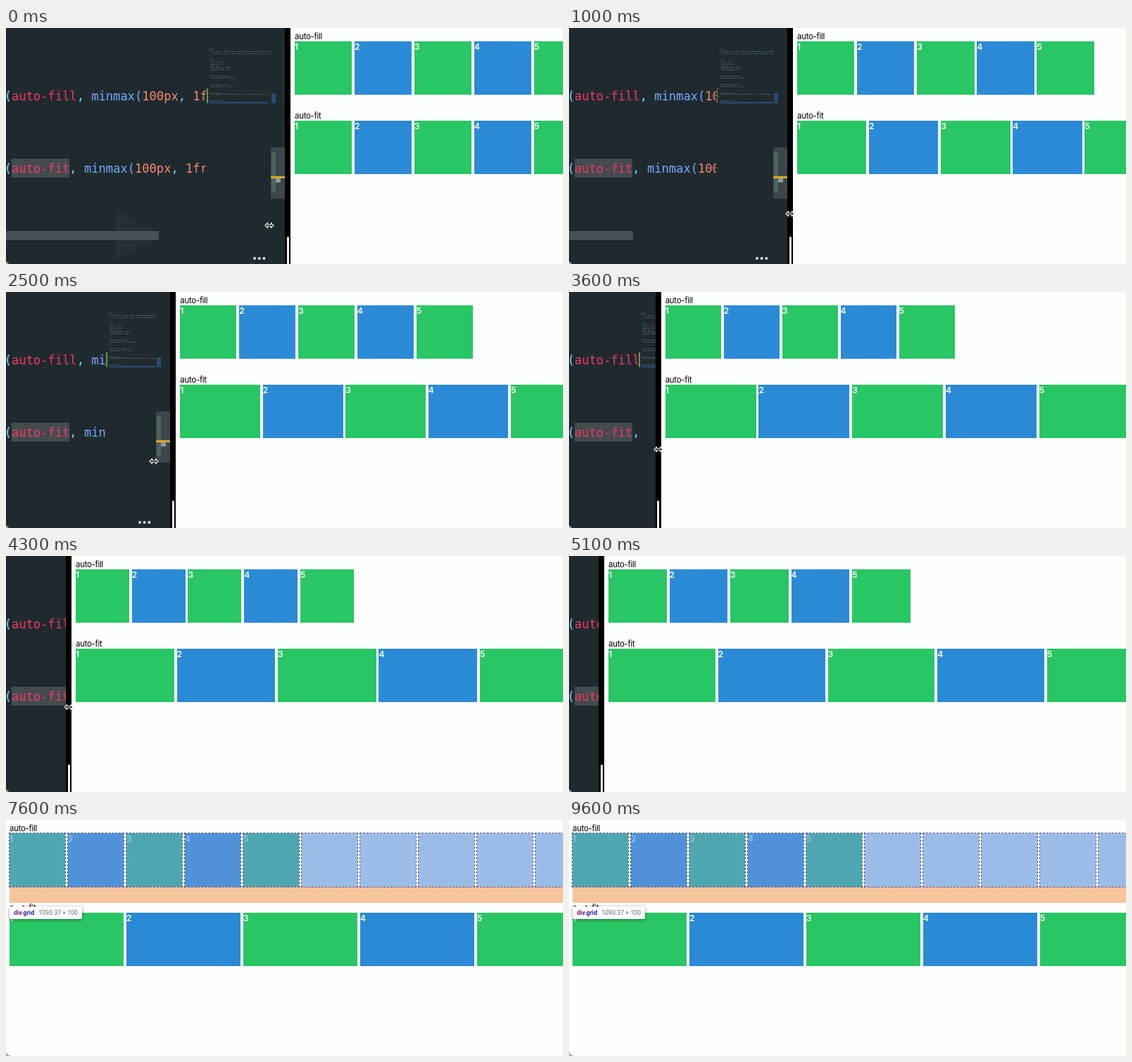
An HTML page for the animation above (9.7 s loop, 791x336 px).

```html
<!DOCTYPE html>
<html lang="en">
<head>
<meta charset="utf-8">
<title>auto-fill and auto-fit</title>
<style>
@property --x { syntax: "<length>"; inherits: true; initial-value: 404px; }
@property --w { syntax: "<length>"; inherits: true; initial-value: 421.2px; }

* { box-sizing: border-box; }
html, body { margin: 0; width: 100%; height: 100%; overflow: hidden; background: #a9abad; }

#stage {
  --edge: calc(var(--x) - 8px);
  --inner: max(var(--edge), 184px);
  --map: calc(284px - .877 * (396px - var(--inner)));
  position: relative;
  width: 791px;
  height: 336px;
  overflow: hidden;
  border-bottom-left-radius: 7px;
  background: #000;
  animation: drag 9.7s infinite;
}
#stage div, #stage pre, #stage svg { position: absolute; }

@keyframes drag {
  0% { --x: 404px; --w: 421.2px; animation-timing-function: steps(10); }
  10.309% { --x: 318px; --w: 506.8px; animation-timing-function: steps(15); }
  25.773% { --x: 241.3px; --w: 583.7px; animation-timing-function: steps(11); }
  37.113% { --x: 130.7px; --w: 660px; animation-timing-function: steps(15); }
  52.577% { --x: 50px; --w: 775px; animation-timing-function: steps(9); }
  61.855%, 100% { --x: -1px; --w: 826.2px; }
}

/* editor */
#editor { left: 0; top: 0; height: 336px; width: max(var(--edge), 0px); overflow: hidden; background: #1f2a2f; }
.row { left: -2.3px; font: 17.1px/20px "DejaVu Sans Mono", monospace; white-space: pre; color: #82d8fb; }
.row b { font-weight: 400; color: #f8385f; }
.row i { font-style: normal; color: #74adfa; }
.row u { text-decoration: none; color: #f78c6c; }
#mark { left: 8px; top: 186px; width: 82px; height: 27px; background: #434b4f; }
#hbar { left: 0; top: 289px; height: 13px; background: #465055; width: max(0px, calc(217px - 1.465 * (396px - var(--inner)))); }
#play { left: 156px; top: 258px; width: 64px; height: 74px; background: #243036; clip-path: polygon(0 0, 100% 50%, 0 100%); animation: ghost 9.7s step-end infinite; }
@keyframes ghost { 0% { opacity: 1; } 5.154%, 100% { opacity: 0; } }

#map { left: var(--map); top: 0; width: 200px; height: 260px; background: #1f2a2f; }
#map pre {
  left: 4px; top: 28.5px; margin: 0;
  font: 9px/11.7px "DejaVu Sans Mono", monospace;
  color: #a9b6bd;
  transform: scale(.25);
  transform-origin: 0 0;
}
#map b { font-weight: 400; color: #e0857a; }
#map i { font-style: normal; color: #a9cf8a; }
#map em { font-style: normal; color: #6a95d0; background: #233f60; }
#change { left: 1px; top: 86px; width: 1.5px; height: 21px; background: #6c9a3c; }

#rail { left: calc(var(--inner) - 20px); top: 0; width: 20px; height: 260px; background: #1f2a2f; }
#rail div:nth-child(1) { left: 1px; top: 93px; width: 6px; height: 14px; background: #2b4a73; }
#rail div:nth-child(2) { left: 0; top: 170px; width: 20px; height: 73px; background: #3c474c; }
#rail div:nth-child(3) { left: 1px; top: 177px; width: 6px; height: 57px; background: #50645a; }
#rail div:nth-child(4) { left: 7px; top: 213px; width: 7px; height: 7px; background: #8d9698; }
#rail div:nth-child(5) { left: 0; top: 211px; width: 20px; height: 2.5px; background: #dca728; }
#dots { left: calc(var(--inner) - 45px); top: 325.5px; width: 4px; height: 4px; border-radius: 50%; background: #dfe2e3; box-shadow: 6.7px 0 #dfe2e3, 13.4px 0 #dfe2e3; }

#grip { left: calc(var(--x) - 5.5px); top: 297px; width: 3px; height: 42px; border-radius: 2px; background: #f2f2f2; }

/* page */
#page { left: var(--x); top: 0; width: 900px; height: 336px; background: #fefefe; color: #000; }
.name { left: 6px; height: 14px; font: 11.5px/14px Inter, sans-serif; letter-spacing: -.3px; }
.grid {
  left: 6px;
  width: var(--w);
  display: grid;
  grid-auto-rows: 76px;
  gap: 3.79px;
  font: 600 12px/16px Inter, sans-serif;
  color: #fff;
}
#stage .grid > div { position: static; background: #28c664; }
#stage .grid > div:nth-child(even) { background: #2b8ad6; }
.fill { top: 19px; grid-template-columns: repeat(auto-fill, minmax(75.8px, 1fr)); }
.fit { top: 132px; grid-template-columns: repeat(auto-fit, minmax(75.8px, 1fr)); }

/* inspector */
.hover { left: 0; top: 0; width: 900px; height: 336px; }
#first { animation: first 9.7s step-end infinite; }
#second { animation: second 9.7s step-end infinite; }
@keyframes first { 0% { opacity: 0; } 62.886% { opacity: 1; } 67.01%, 100% { opacity: 0; } }
@keyframes second { 0% { opacity: 0; } 67.01%, 100% { opacity: 1; } }
#text { left: 6px; top: 5px; width: 40px; height: 14px; background: rgba(101, 151, 219, .64); }
#margin { left: 6px; top: 95px; width: 826px; height: 23px; background: #f6c59b; }
#stage #second .grid > div { background: rgba(101, 151, 219, .64); outline: 1px dashed #44509a; outline-offset: -.5px; }
.tip {
  left: 6px; height: 18px; padding: 0 6px;
  border-radius: 2px;
  background: #fff;
  box-shadow: 0 1px 4px rgba(0, 0, 0, .45);
  font: 8.8px/18px Roboto, sans-serif;
  white-space: pre;
  color: #666;
}
.tip::before { content: ""; position: absolute; left: 6px; top: -6px; border: 6px solid transparent; border-top: 0; border-bottom-color: #fff; }
.tip b { margin-right: 6px; color: #7d1580; }
.tip i { font-style: normal; color: #1f1fa8; }

#cursor { left: -8px; top: -6px; width: 16px; height: 12px; animation: point 9.7s infinite, hide 9.7s step-end infinite; }
@keyframes point {
  0% { transform: translate(374px, 281px); animation-timing-function: steps(10); }
  10.309% { transform: translate(314px, 264.5px); animation-timing-function: steps(15); }
  25.773% { transform: translate(210px, 241px); animation-timing-function: steps(11); }
  37.113% { transform: translate(127px, 224px); animation-timing-function: steps(15); }
  52.577%, 100% { transform: translate(46px, 205px); }
}
@keyframes hide { 0% { opacity: 1; } 45%, 100% { opacity: 0; } }
</style>
</head>
<body>
<div id="stage">
  <div id="editor">
    <div id="play"></div>
    <div id="mark"></div>
    <div class="row" style="top:87px">(<b>auto-fill</b>, <i>minmax(</i><u>100px</u>, <u>1fr</u>))</div>
    <div class="row" style="top:190px">(<b>auto-fit</b>, <i>minmax(</i><u>100px</u>, <u>1fr</u>))</div>
    <div id="hbar"></div>
    <div id="map">
      <div id="change"></div>
<pre>body {
  font-family: -apple-system, BlinkMacSystemFont, <i>"Segoe UI"</i>, Roboto,
    Ubuntu, Cantarell, <i>"Open Sans"</i>, <i>"Helvetica Neue"</i>, sans-serif;
}

.grid {
  color: <b>white</b>;
  display: <b>grid</b>;
  gap: <b>5px</b>;
  grid-auto-rows: <b>100px</b>;
  margin-bottom: <b>30px</b>;
}

.item:nth-child(even) {
  background-color: <b>#3498db</b>;
}

.item:nth-child(odd) {
  background-color: <b>#2ecc71</b>;
}

.grid.auto-fill {
  grid-template-columns: repeat(<b>auto-fill</b>, minmax(<b>100px</b>, 1fr));
}

.grid.auto-fit {
<em>  grid-template-columns: repeat(auto-fit, minmax(100px, 1fr)); </em>
}</pre>
    </div>
    <div id="rail"><div></div><div></div><div></div><div></div><div></div></div>
    <div id="dots"></div>
  </div>
  <div id="grip"></div>

  <div id="page">
    <div class="name" style="top:5px">auto-fill</div>
    <div class="grid fill"><div>1</div><div>2</div><div>3</div><div>4</div><div>5</div></div>
    <div class="name" style="top:118px">auto-fit</div>
    <div class="grid fit"><div>1</div><div>2</div><div>3</div><div>4</div><div>5</div></div>

    <div class="hover" id="first">
      <div id="text"></div>
      <div class="tip" style="top:25px"><b>#text</b>56.72 × 21</div>
    </div>
    <div class="hover" id="second">
      <div id="margin"></div>
      <div class="grid fill"><div></div><div></div><div></div><div></div><div></div><div></div><div></div><div></div><div></div><div></div></div>
      <div class="tip" style="top:123px"><b>div<i>.grid</i></b>1090.37 × 100</div>
    </div>
  </div>

  <svg id="cursor" viewBox="-8 -6 16 12">
    <path d="M-6 0L-2.5-3.5V-1.2H2.5V-3.5L6 0L2.5 3.5V1.2H-2.5V3.5Z" fill="#111" stroke="#fff" stroke-width="1.1"/>
  </svg>
</div>
</body>
</html>
```
